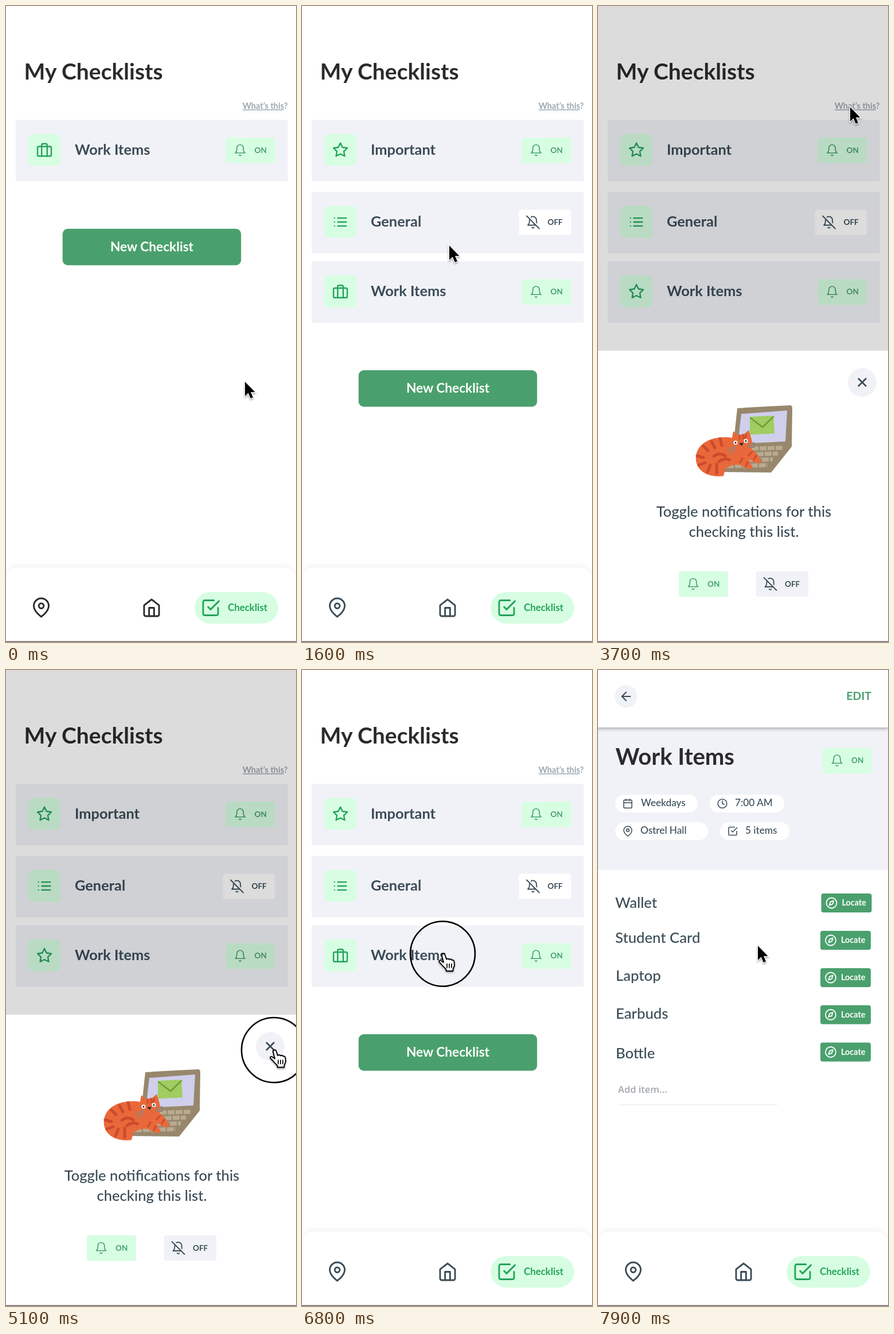
An HTML page for the animation above (8 s loop, 506 by 1107 pixels).

```html
<!DOCTYPE html>
<html lang="en">
<head>
<meta charset="utf-8">
<title>My Checklists</title>
<style>
  html, body { margin: 0; width: 100%; height: 100%; overflow: hidden; background: #fff; }
  svg { display: block; }
  #stage { position: fixed; inset: 0; width: 100%; height: 100%; }
  text { font-family: Lato, "Open Sans", sans-serif; }
  .nav-shape { filter: drop-shadow(0 -3px 5px rgba(0, 0, 0, .05)); }
  .header { filter: drop-shadow(0 2px 3px rgba(0, 0, 0, .32)); }
  .pointer { filter: drop-shadow(0 2px 1.5px rgba(0, 0, 0, .35)); }
</style>
</head>
<body>
<svg id="stage" viewBox="0 0 506 1107"></svg>
<script>
const W = 506, H = 1107, LOOP = 8000;
const INK = '#2b2b2d', SLATE = '#3a4c57', GREEN = '#4aa06c', LEAF = '#23a35a', MINT = '#d7fee2', MIST = '#f1f2f7';

const ICONS = {
  pin: '<path d="M21 10c0 7-9 13-9 13s-9-6-9-13a9 9 0 0 1 18 0z"/><circle cx="12" cy="10" r="3"/>',
  home: '<path d="M3 9l9-7 9 7v11a2 2 0 0 1-2 2H5a2 2 0 0 1-2-2z"/><path d="M9 22V12h6v10"/>',
  check: '<path d="M9 11l3 3L22 4M21 12v7a2 2 0 0 1-2 2H5a2 2 0 0 1-2-2V5a2 2 0 0 1 2-2h11"/>',
  bell: '<path d="M18 8A6 6 0 0 0 6 8c0 7-3 9-3 9h18s-3-2-3-9M13.7 21a2 2 0 0 1-3.4 0"/>',
  mute: '<path d="M13.7 21a2 2 0 0 1-3.4 0M18.6 13A17.9 17.9 0 0 1 18 8M6.3 6.3A5.9 5.9 0 0 0 6 8c0 7-3 9-3 9h14M18 8a6 6 0 0 0-9.3-5M1 1l22 22"/>',
  work: '<rect x="2" y="7" width="20" height="14" rx="2"/><path d="M16 21V5a2 2 0 0 0-2-2h-4a2 2 0 0 0-2 2v16"/>',
  star: '<path d="M12 2l3.1 6.3 6.9 1-5 4.9 1.2 6.8-6.2-3.2L5.8 21 7 14.2 2 9.3l6.9-1z"/>',
  list: '<path d="M8 6h13M8 12h13M8 18h13M3 6h.01M3 12h.01M3 18h.01"/>',
  cross: '<path d="M18 6L6 18M6 6l12 12"/>',
  back: '<path d="M19 12H5M12 19l-7-7 7-7"/>',
  date: '<rect x="3" y="4" width="18" height="18" rx="2"/><path d="M16 2v4M8 2v4M3 10h18"/>',
  clock: '<circle cx="12" cy="12" r="10"/><path d="M12 6v6l4 2"/>',
  compass: '<circle cx="12" cy="12" r="10"/><path d="M16.2 7.8l-2.1 6.3-6.3 2.1 2.1-6.3z"/>'
};

const icon = (name, cx, cy, scale, color, width = 2) =>
  `<g transform="translate(${cx} ${cy}) scale(${scale}) translate(-12 -12)" fill="none" stroke="${color}" stroke-width="${width}" stroke-linecap="round" stroke-linejoin="round">${ICONS[name]}</g>`;
const rect = (x, y, w, h, fill, r = 0, extra = '') =>
  `<rect x="${x}" y="${y}" width="${w}" height="${h}" rx="${r}" fill="${fill}" ${extra}/>`;
const text = (x, y, size, weight, fill, str, extra = '') =>
  `<text x="${x}" y="${y}" font-size="${size}" font-weight="${weight}" fill="${fill}" ${extra}>${str}</text>`;
const group = (x, y, body) => `<g transform="translate(${x} ${y})">${body}</g>`;
const shape = (d, fill, extra = '') => `<path d="${d}" fill="${fill}" ${extra}/>`;
const stroke = (d, color, width) => shape(d, 'none', `stroke="${color}" stroke-width="${width}" stroke-linecap="round" stroke-linejoin="round"`);
const MIDDLE = 'text-anchor="middle"';

const badgeOn = (x, y) => group(x, y, rect(0, 0, 86, 44.5, MINT, 4) +
  icon('bell', 25, 22, .95, GREEN, 1.8) + text(50, 26.5, 13.5, 700, GREEN, 'ON'));
const badgeOff = (x, y, fill) => group(x, y, rect(0, 0, 91, 44, fill, 4) +
  icon('mute', 24.5, 22, 1, SLATE, 1.8) + text(50, 26.5, 13.5, 700, SLATE, 'OFF'));

function card(y, name, glyphs, on) {
  return group(17, y, rect(0, 0, 474.5, 107, MIST) + rect(22, 24.5, 56, 55.5, MINT, 8) + glyphs +
    text(103, 60.5, 25.4, 700, SLATE, name) + (on ? badgeOn(366.5, 31) : badgeOff(361.5, 31, '#fff')));
}
const glyph = (name, scale = 1.2) => icon(name, 50, 52.5, scale, LEAF);

function nav(color) {
  return shape('M0 1107V1001Q0 977 24 977H482Q506 977 506 1001V1107Z', '#fff', 'class="nav-shape"') +
    icon('pin', 61.5, 1047, 1.45, color) + icon('home', 254, 1047.5, 1.45, color) +
    rect(329, 1020, 146, 55, MINT, 27.5) + icon('check', 357, 1047.5, 1.45, LEAF) +
    text(387, 1053, 16.9, 700, LEAF, 'Checklist');
}

function listView(cards, buttonY, navColor) {
  return rect(0, 0, W, H, '#fff') + text(31.5, 128, 39, 700, INK, 'My Checklists') +
    text(491.5, 179, 14.5, 700, '#9ba8b1', '<tspan text-decoration="underline">What’s this</tspan>?', 'text-anchor="end"') +
    cards + rect(98.7, buttonY - .2, 311.5, 63.4, GREEN, 9) +
    text(254.5, buttonY + 38.5, 22.7, 700, '#fff', 'New Checklist', MIDDLE) + nav(navColor);
}

function catAndLaptop() {
  const brown = '#97876c', orange = '#e9683a', rust = '#cd4a2d', grey = '#8b857c';
  let keys = '';
  for (let row = 0; row < 4; row++) {
    const y = 771 + row * 10, x = 240 - row * 5;
    keys += `<path d="M${x} ${y}L${x + 83 - row * 4} ${y - 2}" stroke="#b9aa90" stroke-width="7" stroke-dasharray="12 2"/>`;
  }
  return shape('M243 700Q290 697 336 695Q339 696 339 700L338 767L302 812L214 811L236 766Z', brown) +
    shape('M250 710L330 704L327 758L244 762Z', '#cfcfec') + keys +
    shape('M265 715L306 713L308 744L265 746Z', '#a0cd5f') + stroke('M266 717L287 733L306 715', '#6d9b3c', 2.5) +
    shape('M219 818C190 822 168 807 171 783C174 760 200 748 230 751C250 755 267 766 284 789Q285 797 277 796L262 788L270 803Q265 810 253 801C240 795 230 800 222 806Z', orange) +
    shape('M233 757L236 740L244 747L255 745L263 738L267 751Q272 766 263 775Q250 782 239 774Q232 768 233 757Z', orange) +
    stroke('M184 766L192 774M198 758L204 769M213 753L216 765M173 783L184 786M176 799L187 795M191 811L196 799M207 813L207 797M202 784Q211 776 222 783M211 793Q221 786 229 790', rust, 5) +
    stroke('M247 747V754M253 746V753M258 746L257 752M263 782L269 776M272 789L277 782M248 795L252 787M258 801L261 794', rust, 3) +
    '<g fill="#fff"><circle cx="240" cy="760" r="3.5"/><circle cx="258" cy="757" r="3.5"/></g>' +
    '<g fill="#222"><circle cx="240" cy="760" r="1.6"/><circle cx="258" cy="757" r="1.6"/></g>' +
    shape('M246 761L254 760L251 766Z', '#3a2b28') +
    stroke('M239 767L227 772M241 770L230 779M261 765L272 760M262 768L273 768', grey, 2);
}

function helpSheet() {
  return rect(0, 600, W, 507, '#fff') + `<circle cx="461" cy="655" r="25" fill="${MIST}"/>` +
    icon('cross', 461, 655, 1.05, SLATE, 2.6) + catAndLaptop() +
    text(254.5, 889, 25.6, 500, SLATE, 'Toggle notifications for this', MIDDLE) +
    text(254.5, 924, 25.6, 500, SLATE, 'checking this list.', MIDDLE) +
    badgeOn(141, 984) + badgeOff(276, 984, MIST);
}

const pill = (x, y, w, name, label, gap) => rect(x, y, w, 31, '#fff', 15.5) +
  icon(name, x + 22, y + 15.5, .78, SLATE) + text(x + gap, y + 20, 17.2, 500, SLATE, label);
const locate = (x, y) => group(x, y, rect(0, 0, 88, 33, GREEN, 4) +
  icon('compass', 18, 16.5, .9, '#fff') + text(36, 21, 14.4, 700, '#fff', 'Locate'));

// The left edge bleeds a little past the stage, so it leads the content while sliding in.
function detailView() {
  const items = [['Wallet', 30, 414, 389], ['Student Card', 30, 475, 454], ['Laptop', 31, 541, 519],
    ['Earbuds', 31, 607, 583.5], ['Bottle', 31, 676, 648.5]];
  return rect(-4.5, 0, W + 4.5, H, '#fff') + rect(-4.5, 90, W + 4.5, 258, MIST) +
    rect(-4.5, 0, W + 4.5, 100, '#fff', 0, 'class="header"') +
    `<circle cx="49" cy="46" r="19.5" fill="${MIST}"/>` + icon('back', 49, 46, 1.05, SLATE) +
    text(477, 52, 19.6, 700, GREEN, 'EDIT', 'text-anchor="end"') +
    text(30.5, 165, 40.1, 700, INK, 'Work Items') + badgeOn(392, 135.5) +
    pill(30, 217, 144, 'date', 'Weekdays', 45) + pill(195, 217, 130, 'clock', '7:00 AM', 44) +
    pill(30, 265, 162, 'pin', 'Ostrel Hall', 44) + pill(213, 265, 121, 'check', '5 items', 44) +
    items.map(([name, x, y, top], i) => text(x, y, 25.7, 500, SLATE, name) + locate(i ? 388 : 389.5, top)).join('') +
    text(35, 736, 16.5, 600, '#a3a8ae', 'Add item...', 'style="font-family:\'Open Sans\',sans-serif"') +
    rect(35, 756, 278, 1.2, '#ececef') + nav(SLATE);
}

const arrow = shape('M0 0V25L5.7 19.5L9.8 29L14 27.2L10 18H17.5Z', '#000',
  'stroke="#fff" stroke-width="2.4" paint-order="stroke" class="pointer"');
const hand = '<g class="pointer">' +
  shape('M-1.5 3C-2-1 3-1.5 4 2L6.5 9.5C8 8 10.5 8 11.5 10C13 8.7 15.5 9 16 11C18 10 20 11.5 20 14L20.5 19C20.5 23 18.5 24 18 27V30H6V27C3 24 0 21-2.5 18C-5 15.5-6.5 14.5-6.5 13C-6 10.5-3 11-1 13.5L1.5 15Z', '#fff', 'stroke="#000" stroke-width="1.9" stroke-linejoin="round"') +
  stroke('M7.5 17.5V24M11.5 17.5V24M15.5 17.5V24', '#000', 1.7) + '</g>';

const work = glyph('work');
const stage = document.getElementById('stage');
stage.innerHTML =
  `<g id="first">${listView(card(198, 'Work Items', work, true), 388, INK)}</g>` +
  `<g id="main">${listView(card(198, 'Important', glyph('star'), true) + card(323.5, 'General', glyph('list', 1.15), false) +
    card(444.5, 'Work Items', `<g id="workIcon">${work}</g><g id="starIcon">${glyph('star')}</g>`, true), 634.2, SLATE)}</g>` +
  rect(0, 0, W, H, '#000', 0, 'id="dim"') +
  `<g id="sheet">${helpSheet()}</g><g id="detail">${detailView()}</g>` +
  '<circle id="ring" r="56.5" fill="none" stroke="#000" stroke-width="2.6"/>' +
  `<g id="cursor"><g id="arrow">${arrow}</g><g id="hand">${hand}</g></g>` + rect(0, 1105.5, W, 1.5, '#6a6a6a');

const parts = Object.fromEntries(['first', 'main', 'workIcon', 'starIcon', 'dim', 'sheet', 'detail', 'ring', 'cursor', 'arrow', 'hand']
  .map(id => [id, document.getElementById(id)]));
const show = (part, on) => part.setAttribute('display', on ? 'inline' : 'none');
const move = (part, x, y) => part.setAttribute('transform', `translate(${x} ${y})`);
const ramp = (t, start, length) => Math.min(1, Math.max(0, (t - start) / length));
const slide = (t, start, length) => 1 - (1 - ramp(t, start, length)) ** 1.7;
const within = (t, spans) => spans.some(([a, b]) => t >= a && t < b);

// time, x, y of the pointer tip
const PATH = [[0, 417, 654], [200, 417, 654], [850, 257, 417], [1900, 257, 417], [2700, 440, 176], [3750, 440, 176],
  [4700, 467.5, 661.5], [5700, 467.5, 661.5], [5900, 472, 660], [6000, 425, 597], [6100, 398, 566], [6200, 320, 548],
  [6450, 245.5, 494], [6890, 245.5, 494], [6990, 246.5, 493], [7600, 246.5, 493], [7900, 279, 480], [LOOP, 279, 480]];
const HANDS = [[760, 1250], [2660, 3250], [4650, 5200], [6200, 6880]];
const CLICKS = [[1050, 1220], [3150, 3320], [5030, 5190], [6730, 6890]];

function pointer(t) {
  const i = PATH.findIndex(p => p[0] > t);
  const [t0, x0, y0] = PATH[i - 1], [t1, x1, y1] = PATH[i];
  const k = (t - t0) / (t1 - t0);
  return [x0 + (x1 - x0) * k, y0 + (y1 - y0) * k];
}

function draw(t) {
  const fade = ramp(t, 1200, 200);
  const sheet = slide(t, 3238, 400) - slide(t, 5150, 260);
  const push = slide(t, 6850, 515);
  const [x, y] = pointer(t);

  parts.main.setAttribute('opacity', fade);
  move(parts.main, -130 * push, 0);
  show(parts.first, fade < 1);
  show(parts.starIcon, sheet > 0);
  show(parts.workIcon, sheet <= 0);
  parts.dim.setAttribute('opacity', .137 * sheet + .58 * push);
  show(parts.sheet, sheet > 0);
  move(parts.sheet, 0, 507 * (1 - sheet));
  show(parts.detail, push > 0);
  move(parts.detail, W * (1 - push), 0);

  const pointing = within(t, HANDS);
  move(parts.cursor, x, y);
  show(parts.hand, pointing);
  show(parts.arrow, !pointing);
  move(parts.ring, x, y);
  show(parts.ring, within(t, CLICKS));
}

const start = performance.now();
function tick() {
  draw((performance.now() - start) % LOOP);
  requestAnimationFrame(tick);
}
tick();
</script>
</body>
</html>
```
